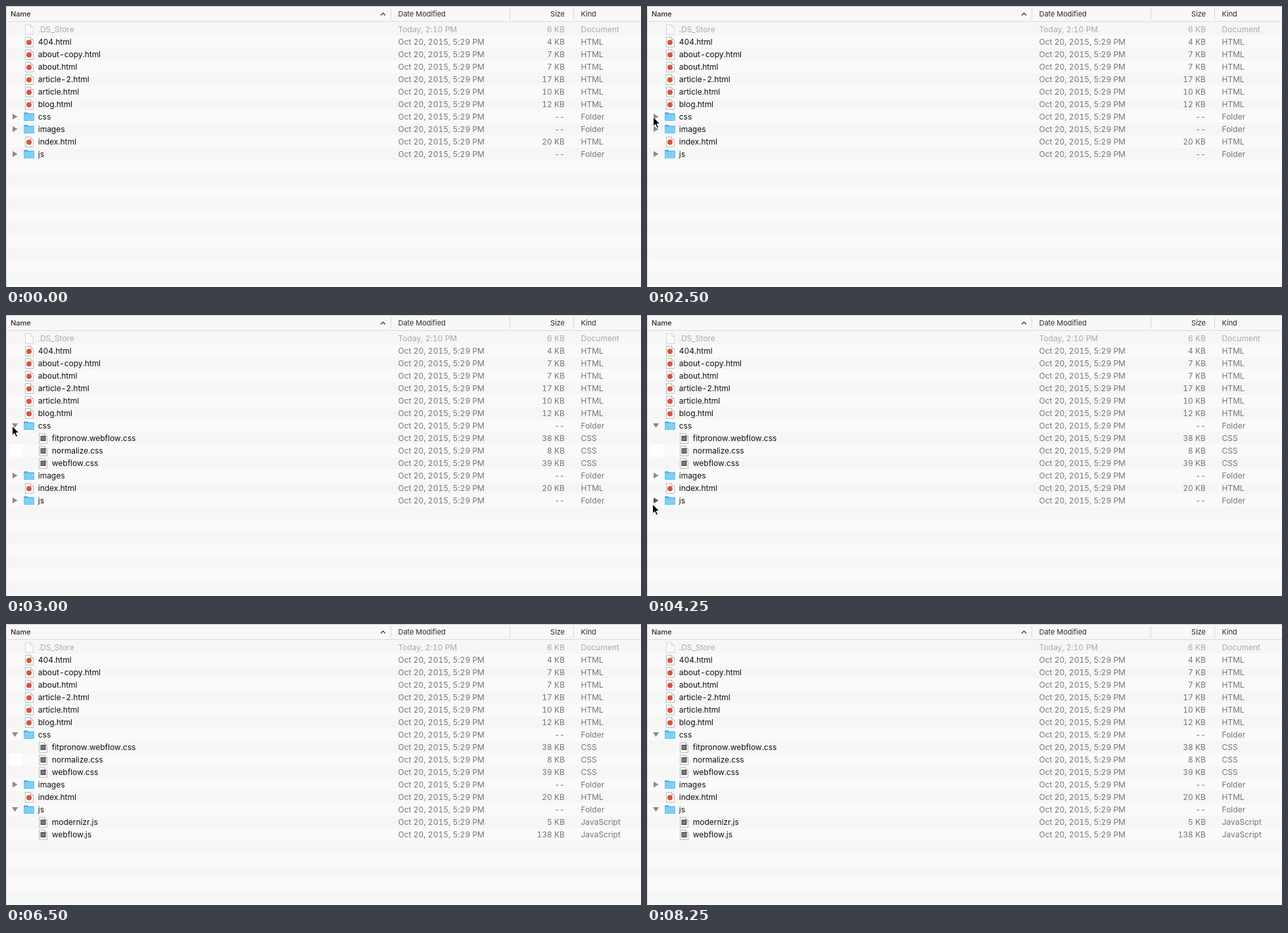
Recreate the animation shown at these times as an HTML page. Size 966 by 428 pixels, loop 9000 ms.

```html
<!DOCTYPE html>
<html lang="en">
<head>
<meta charset="utf-8">
<title>File list</title>
<style>
  html, body { margin: 0; width: 966px; height: 428px; overflow: hidden; background: #fafafa; }
  svg { display: block; }
  text { font: 12px Inter, "Open Sans", sans-serif; font-variant-numeric: tabular-nums; letter-spacing: .02px; fill: #757575; }
  .name { letter-spacing: -.03px; fill: #101010; }
  .dim text { fill: #a9a9a9; }
  .dim .page { opacity: .5; }
  .head text { font-size: 11px; letter-spacing: -.04px; fill: #2c2c2c; }
  .head .sorted { font-weight: 500; }
  .end { text-anchor: end; }
</style>
</head>
<body>
<svg width="966" height="428" viewBox="0 0 966 428">
  <defs>
    <g id="page">
      <path d="M29.5 2.500h8l4 4v11h-12z" fill="#fff" stroke="#b8b8b8"/>
      <path d="M37.5 2.500v4h4" fill="#eee" stroke="#b8b8b8"/>
    </g>
    <g id="html">
      <use href="#page"/>
      <circle cx="35" cy="10.500" r="4" fill="#d4553f"/>
    </g>
    <g id="code">
      <use href="#page"/>
      <rect x="32" y="6.500" width="7" height="7" fill="#777" stroke="#444"/>
    </g>
    <g id="folder">
      <path d="M27 4q0-1 1-1h4.500l1.500 1.500h8q1 0 1 1v9.500q0 1-1 1h-14q-1 0-1-1z" fill="#55b5e5"/>
      <path d="M27.500 6h15v9.500h-15z" fill="#7dcff8"/>
    </g>
    <path id="shut" d="M10 5l7.500 4.500l-7.500 4.500z"/>
    <path id="open" d="M9 6h9.200l-4.600 7z"/>
  </defs>
  <g id="list"></g>
  <g class="head">
    <path d="M0 0h966v23h-966z" fill="#f8f8f8"/>
    <path d="M0 .5h966" stroke="#c9c9c9"/>
    <path d="M0 23.500h966" stroke="#dadada"/>
    <path d="M585.500 3v18M766.500 3v18M863.500 3v18" stroke="#d6d6d6"/>
    <path d="M570 14.200l3.500-3.500l3.500 3.500" fill="none" stroke="#3c3c3c" stroke-width="1.300"/>
    <text class="sorted" x="7" y="16">Name</text>
    <text x="596.500" y="16">Date Modified</text>
    <text class="end" x="850" y="16">Size</text>
    <text x="874.500" y="16">Kind</text>
  </g>
  <path d="M.5 0v428" stroke="#d2d2d2"/>
  <path id="cursor" d="M1.500 1v14.500l3.300-3.200l2.300 5.400l2.400-1l-2.300-5.200h4.600z" fill="#000" stroke="#fff" stroke-linejoin="round"/>
</svg>
<script>
const LOOP = 9000, ROW = 19, TOP = 26, PEEK = 3;
const STRIPE = '#f6f6f6';
const DATE = 'Oct 20, 2015, 5:29 PM';

// name, size, icon, kind
const html = (name, size) => ({ name, size, icon: 'html', kind: 'HTML' });
const code = (name, size, kind) => ({ name, size, kind, icon: 'code', child: true });
const folder = (name, kids = []) => ({ name, kids, size: '--', icon: 'folder', kind: 'Folder' });

const files = [
  { name: '.DS_Store', size: '6 KB', icon: 'page', kind: 'Document', date: 'Today, 2:10 PM', dim: true },
  html('404.html', '4 KB'),
  html('about-copy.html', '7 KB'),
  html('about.html', '7 KB'),
  html('article-2.html', '17 KB'),
  html('article.html', '10 KB'),
  html('blog.html', '12 KB'),
  folder('css', [
    code('fitpronow.webflow.css', '38 KB', 'CSS'),
    code('normalize.css', '8 KB', 'CSS'),
    code('webflow.css', '39 KB', 'CSS')
  ]),
  folder('images'),
  html('index.html', '20 KB'),
  folder('js', [
    code('modernizr.js', '5 KB', 'JavaScript'),
    code('webflow.js', '138 KB', 'JavaScript')
  ])
];

// When each folder starts to open and when it is fully open
const opening = { css: [2750, 3000], js: [4500, 4750] };

// time, x, y
const moves = [
  [1250, 28, 13], [1500, 26, 103], [1750, 33, 131], [2000, 10, 157],
  [2250, 8, 167], [2500, 8, 168], [3500, 10, 204], [3750, 10.5, 265],
  [4000, 7, 287]
];
const HIDE = 6500;

const list = document.getElementById('list');
const cursor = document.getElementById('cursor');

const rect = (x, y, w, h, fill) =>
  `<rect x="${x}" y="${y}" width="${w}" height="${h}" fill="${fill}"/>`;

function openState(name, t) {
  const [start, full] = opening[name] || [LOOP, LOOP];
  return t < start ? 0 : t < full ? 1 : 2;
}

function drawRow(file, y, t) {
  const indent = file.child ? 21 : 0;
  let arrow = '';
  if (file.kids) {
    const shape = openState(file.name, t) ? 'open' : 'shut';
    const pressed = file.name === 'js' && t >= 4250 && t < 4500;
    arrow = `<use href="#${shape}" fill="${pressed ? '#555' : '#8b8b8b'}"/>`;
  }
  return `<g transform="translate(0 ${y})" class="${file.dim ? 'dim' : ''}">${arrow}
    <use href="#${file.icon}" x="${indent}" class="${file.icon}"/>
    <text class="name" x="${48.8 + indent}" y="14">${file.name}</text>
    <text x="596.5" y="14">${file.date || DATE}</text>
    <text class="end" x="850" y="14">${file.size}</text>
    <text x="874.5" y="14">${file.kind}</text></g>`;
}

function drawList(t) {
  let rows = '', y = TOP, gap = Infinity;
  for (const file of files) {
    rows += drawRow(file, y, t);
    y += ROW;
    const state = openState(file.name, t);
    if (state === 1) {
      gap = y;
      rows += rect(50, y + 0.6, 12, 1, '#aaa');
      y += PEEK;
    } else if (state === 2) {
      for (const kid of file.kids) {
        rows += drawRow(kid, y, t);
        y += ROW;
      }
    }
  }

  let stripes = rect(0, 24, 966, 2, STRIPE);
  for (let top = TOP; top < 428; top += 2 * ROW) {
    const shift = top >= gap ? PEEK : 0;
    stripes += rect(0, top + shift, 966, ROW, STRIPE);
  }
  if (gap < Infinity) stripes += rect(0, gap, 966, PEEK, STRIPE);
  if (t >= 3000 && t < 7500) stripes += rect(7, 197, 18, ROW, '#fff');
  return stripes + rows;
}

function placeCursor(t) {
  const at = moves.filter(m => m[0] <= t).pop();
  const shown = at && t < HIDE;
  cursor.style.display = shown ? '' : 'none';
  if (shown) cursor.setAttribute('transform', `translate(${at[1]} ${at[2]})`);
}

let last = -1;
const begin = performance.now();

function tick() {
  const t = Math.floor(((performance.now() - begin) % LOOP) / 250) * 250;
  if (t !== last) {
    list.innerHTML = drawList(t);
    placeCursor(t);
    last = t;
  }
  requestAnimationFrame(tick);
}
tick();
</script>
</body>
</html>
```
